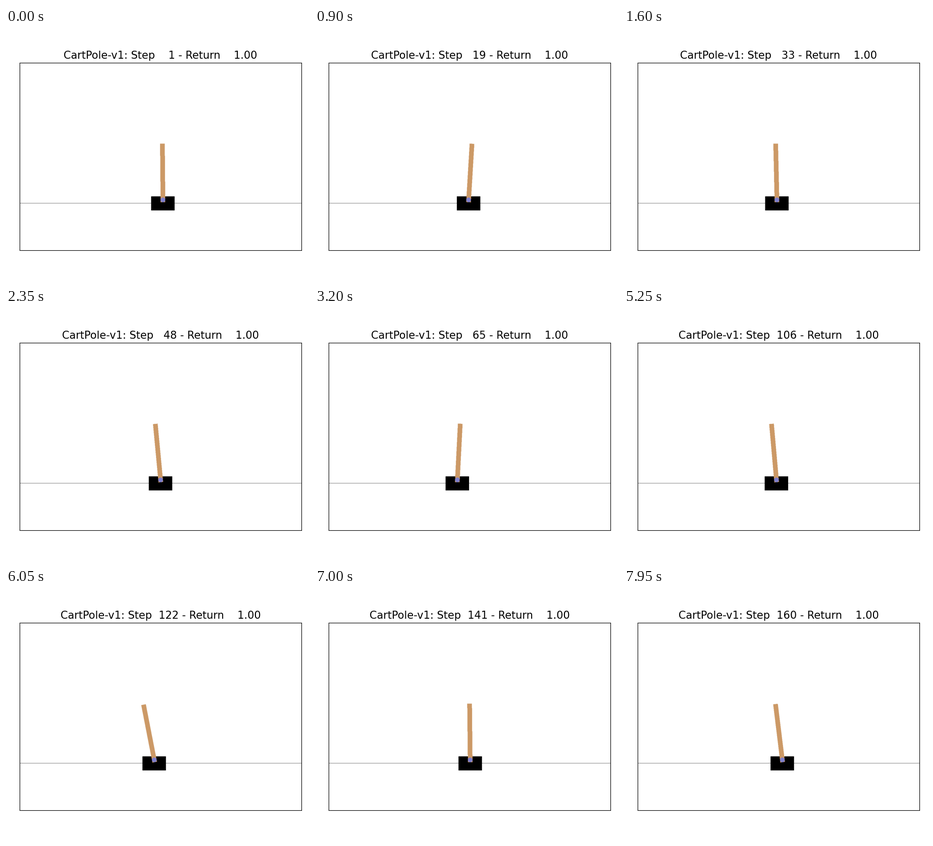
Animation of 600 by 500 pixels, one loop 8 s. Source, as a matplotlib script:

```python
import numpy as np
import matplotlib.pyplot as plt
from matplotlib.animation import FuncAnimation

FRAMES, INTERVAL = 160, 50
W, H = 1200, 800          # size of the rendered scene
SCALE = 250               # scene pixels per metre
TRACK_Y, AXLE_Y = 200, 215
POLE, AXLE = (204, 153, 102), (127, 127, 204)

# Key poses: frame -> cart position, pole angle.
# A pole leaning beyond LIMIT has fallen, and a new episode begins.
LIMIT = 0.19
POSES = {
    0: (0.041, -0.009), 18: (-0.015, 0.059), 28: (-0.090, 0.200),
    47: (0.001, -0.094), 64: (-0.206, 0.051), 73: (-0.376, 0.200),
    88: (-0.015, -0.037), 121: (-0.1065, -0.192), 159: (0.065, -0.122),
}


def cart_pole_step(tau=0.02, g=9.8, m_cart=1.0, m_pole=0.1, half=0.5):
    """Linear cart-pole: state (x, v, theta, omega) and force to next state."""
    total = m_cart + m_pole
    arm = half * (4 / 3 - m_pole / total)
    k = m_pole * half / total
    turn_t, turn_f = g / arm, -1 / (total * arm)
    push_t, push_f = -k * turn_t, 1 / total - k * turn_f
    step = np.eye(4) + tau * np.array([[0, 1, 0, 0], [0, 0, push_t, 0],
                                       [0, 0, 0, 1], [0, 0, turn_t, 0]])
    return step, tau * np.array([0, push_f, 0, turn_f])


def solve_episode(start, stop, force=10, spread=0.03, tol=0.001):
    """Most likely path of a randomly pushed cart through its key poses."""
    n = stop - start
    step, push = cart_pole_step()
    states = np.zeros((n, 4, 4 + n))
    states[0, :, :4] = spread * np.eye(4)
    for i in range(1, n):
        states[i] = step @ states[i - 1]
        states[i, :, 3 + i] += force * push
    path = states[:, [0, 2]]
    keys = [f for f in POSES if start <= f < stop]
    rows = np.vstack([path[f - start] for f in keys]) / tol
    goals = np.concatenate([POSES[f] for f in keys]) / tol
    system = np.vstack([rows, np.eye(4 + n)])
    target = np.concatenate([goals, np.zeros(4 + n)])
    return path @ np.linalg.lstsq(system, target, rcond=None)[0]


falls = [f + 1 for f, (_, theta) in POSES.items() if abs(theta) > LIMIT]
poses = np.vstack([solve_episode(a, b)
                   for a, b in zip([0] + falls, falls + [FRAMES])])

TOP, BOTTOM = 300, 640    # rows in which anything moves
grid_x = np.arange(W)[None, :] + 0.5
grid_y = H - np.arange(TOP, BOTTOM)[:, None] - 0.5


def render(x, theta):
    scene = np.full((H, W, 3), 255, np.uint8)
    scene[H - TRACK_Y - 1] = 0
    band = scene[TOP:BOTTOM]
    dx = grid_x - (W / 2 + SCALE * x)
    dy = grid_y - AXLE_Y
    s, c = np.sin(theta), np.cos(theta)
    along, across = dx * s + dy * c, dx * c - dy * s
    band[(abs(dx) < 50) & (abs(grid_y - TRACK_Y) < 30)] = 0
    band[(abs(across) < 10) & (along > -10) & (along < 240)] = POLE
    band[dx**2 + dy**2 < 100] = AXLE
    return scene


fig = plt.figure(figsize=(6, 5), dpi=100, facecolor="white")
ax = fig.add_axes([27.01 / 600, 59.01 / 500, 557.98 / 600, 371.98 / 500])
ax.set_xticks([])
ax.set_yticks([])
image = ax.imshow(render(*poses[0]), aspect="auto", interpolation="hanning")
title = ax.set_title("", fontsize=15, family="DejaVu Sans")


def update(i):
    image.set_data(render(*poses[i]))
    title.set_text(f"CartPole-v1: Step {i + 1:4d} - Return {1:7.2f}")
    return image, title


anim = FuncAnimation(fig, update, frames=FRAMES, interval=INTERVAL, repeat=True)
plt.show()
```
